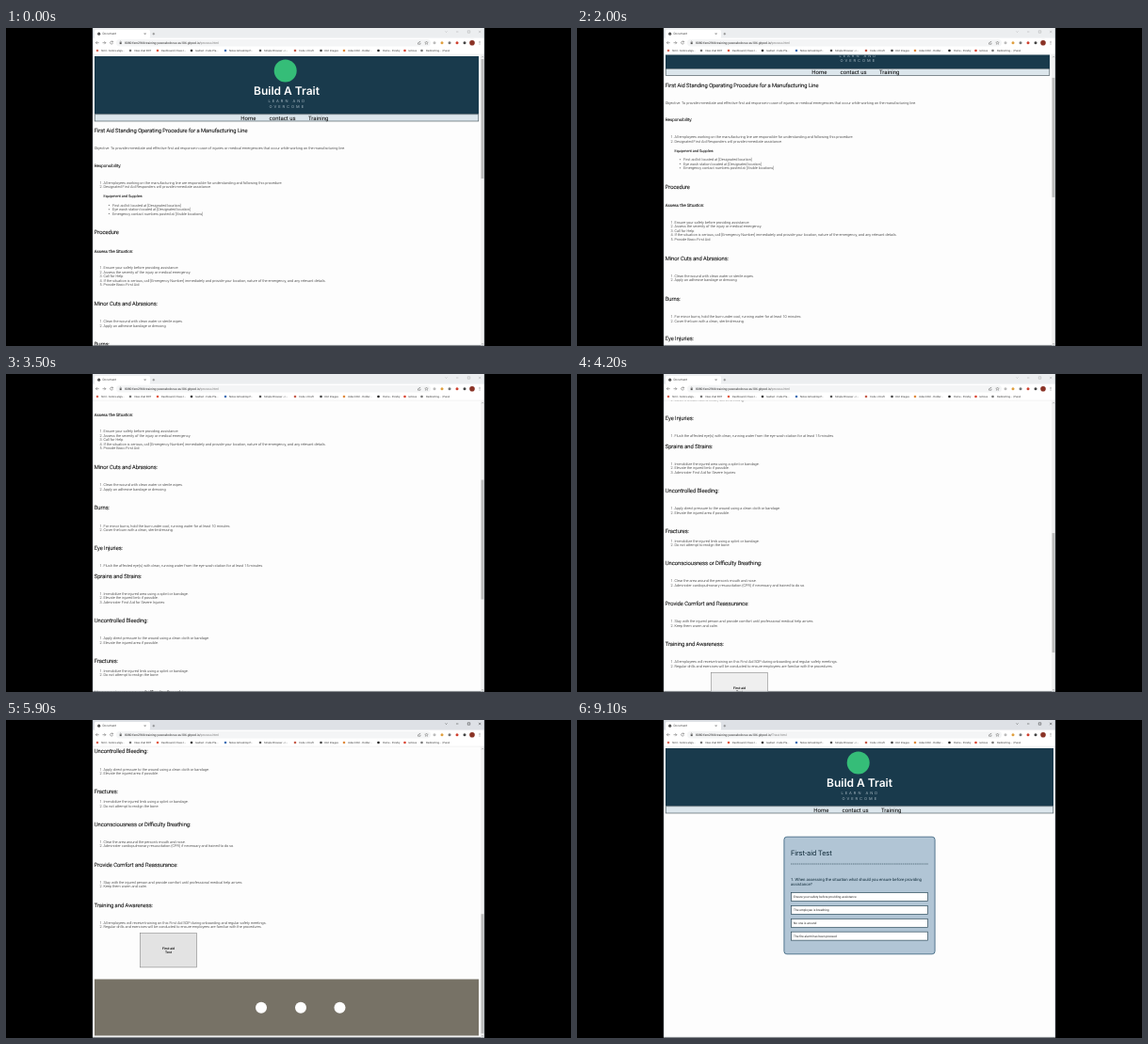
These frames come from a looping animation (600x338 px, 9400 ms). An HTML page:

```html
<!DOCTYPE html>
<html lang="en">
<head>
<meta charset="utf-8">
<title>First aid training</title>
<style>
html, body { margin: 0; width: 100%; height: 100%; overflow: hidden; background: #000; }
svg { display: block; width: 600px; height: 338px; text-rendering: geometricPrecision; font-family: Roboto, sans-serif; }
.logo { font-family: Inter, sans-serif; text-anchor: middle; }
.light, .head { font-weight: 300; fill: #111; }
.head { stroke: #111; stroke-width: 0.03em; }
</style>
</head>
<body>
<svg id="stage" viewBox="0 0 600 338"></svg>
<script>
const LOOP = 9400, CLICK = 5700, LOADED = 6000, TICK = 48.5;
const BODY = 3.89, H3 = BODY * 1.17, H2 = BODY * 1.5, LINE = 4.57;

const text = (x, y, size, str, attrs = '') =>
  `<text x="${x}" y="${y}" font-size="${size}" ${attrs}>${str}</text>`;
const rect = (x, y, w, h, fill, attrs = '') =>
  `<rect x="${x}" y="${y}" width="${w}" height="${h}" fill="${fill}" ${attrs}/>`;
const dot = (x, y, r, fill, attrs = '') =>
  `<circle cx="${x}" cy="${y}" r="${r}" fill="${fill}" ${attrs}/>`;
const line = (d, color, width = 0.5, attrs = '') =>
  `<path d="${d}" fill="none" stroke="${color}" stroke-width="${width}" ${attrs}/>`;
const light = 'class="light"';
const head = (x, y, size, str) => text(x, y, size, str, 'class="head"');

function browser() {
  const marks = [
    [97, 101, '#d86a5c', 'html - Centre align...'], [132, 136.5, '#777', 'New chat BOT'],
    [161, 165, '#e2583e', 'Dashboard | Class I...'], [197, 201, '#333', 'Gadnet - Code Pla...'],
    [233, 237, '#3b6fb5', 'Notes &amp; Desktop P...'], [270, 274, '#555', 'Simple Browser - c...'],
    [307, 311, '#c65b4a', 'Code + Draft'], [334.5, 338, '#444', 'Unit Images'],
    [359, 363, '#e08a3c', 'index.html - Holder...'], [395.5, 400, '#222', 'Home - Pondry'],
    [423.5, 427, '#d9422f', 'notices'], [441.5, 446, '#777', 'Redirecting... | Panel']
  ];
  const tools = [[463, '#e0a040'], [471, '#777'], [479, '#d0402f'], [487, '#444']];
  return rect(92, 0, 416, 28.3, '#fff') + rect(92, 0, 416, 10.6, '#dee1e6', 'id="strip"') +
    rect(94, 2, 59, 9, '#fff', 'rx="1.5"') + dot(98.7, 6.2, 1.6, '#555') +
    text(102.5, 7.4, 3.2, 'Document', 'fill="#444"') +
    line('M146.7 5.2l1.8 1.8m0-1.8l-1.8 1.8M155.5 6.2h2.6m-1.3-1.3v2.6', '#555') +
    line('M466.5 3.5l1 1 1-1M478 4h2.4M490.3 2.8h2.4v2.4h-2.4zM502 2.8l2.4 2.4m0-2.4l-2.4 2.4', '#333', 0.5, 'id="controls"') +
    rect(117, 12, 334, 7.4, '#f4f5f6', 'rx="3.7"') +
    line('M98.8 15.7h-3.4m1.5-1.5l-1.5 1.5 1.5 1.5M102.5 15.7h3.4m-1.5-1.5l1.5 1.5-1.5 1.5', '#555') +
    line('M113.3 14.7a1.5 1.5 0 1 0 .2 1.4M113.5 13.8v1.2h-1.2', '#555') +
    rect(120.7, 15.3, 2, 1.8, '#555') + line('M121.1 15.3v-1q.6-.8 1.2 0v1', '#555', 0.4) +
    line('M437.5 15.5v1.7h2.5v-1.5m-1.6.2q0-1.6 1.8-1.6', '#555') +
    line('M446.5 14l.5 1.2 1.3.1-1 .8.3 1.3-1.1-.7-1.1.7.3-1.3-1-.8 1.3-.1z', '#666', 0.4) +
    tools.map(([x, c]) => dot(x, 15.7, 1.5, c)).join('') + dot(455, 15.7, 1.5, '#bbb') +
    dot(495, 15.7, 2.8, '#8a3326') +
    [14.3, 15.7, 17.1].map(y => dot(503, y, 0.45, '#444')).join('') +
    marks.map(([ix, x, c, s]) => dot(ix, 24, 1.3, c) + text(x, 25, 2.8, s, 'fill="#333"')).join('') +
    line('M92 28.2H508', '#ddd', 0.4) +
    '<g id="url"></g>';
}

const url = path => text(126, 16.9, 3.3,
  `8080-fern2946-training-yesorabolocus-eu106.gitpod.io/<tspan fill="#777">${path}</tspan>`, 'fill="#222"');

// The header is centred, so it shifts when there is no scrollbar.
function header(width) {
  const mid = 94 + width / 2, dx = mid - 298;
  const motto = 'class="logo" fill="#a9bac4" letter-spacing="2"';
  return rect(94, 30, width, 61.5, '#193a4c') +
    dot(mid - 1.3, 45.5, 12, '#35bd78') +
    text(mid, 71, 12, 'Build A Trait', 'class="logo" font-weight="600" fill="#fff"') +
    text(mid + 0.8, 79, 4, 'LEARN AND', motto) +
    text(mid + 0.8, 84.5, 4, 'OVERCOME', motto) +
    rect(94.2, 91.8, width - 0.4, 7.2, '#dce6ec', 'stroke="#37474f" stroke-width="0.6"') +
    [[249.2, 'Home'], [279.6, 'contact us'], [321, 'Training']]
      .map(([x, s]) => text(x + dx, 97.6, 6, s)).join('');
}

const list = (y, items) => items.map((s, i) =>
  text(102.6, y + i * LINE, BODY, i + 1 + '.', light + ' text-anchor="end"') +
  text(103.5, y + i * LINE, BODY, s, light)).join('');

function guide() {
  const sections = [
    [295, 'Minor Cuts and Abrasions:', ['Clean the wound with clean water or sterile wipes.', 'Apply an adhesive bandage or dressing.']],
    [338.3, 'Burns:', ['For minor burns, hold the burn under cool, running water for at least 10 minutes.', 'Cover the burn with a clean, sterile dressing.']],
    [380.7, 'Eye Injuries:', ['Flush the affected eye(s) with clean, running water from the eye wash station for at least 15 minutes.']],
    [410.6, 'Sprains and Strains:', ['Immobilize the injured area using a splint or bandage.', 'Elevate the injured limb if possible.', 'Administer First Aid for Severe Injuries:']],
    [457.8, 'Uncontrolled Bleeding:', ['Apply direct pressure to the wound using a clean cloth or bandage.', 'Elevate the injured area if possible.']],
    [500.6, 'Fractures:', ['Immobilize the injured limb using a splint or bandage.', 'Do not attempt to realign the bone.'], 10.1],
    [535, 'Unconsciousness or Difficulty Breathing:', ['Clear the area around the person\'s mouth and nose.', 'Administer cardiopulmonary resuscitation (CPR) if necessary and trained to do so.']],
    [578, 'Provide Comfort and Reassurance:', ['Stay with the injured person and provide comfort until professional medical help arrives.', 'Keep them warm and calm.']],
    [621, 'Training and Awareness:', ['All employees will receive training on this First Aid SOP during onboarding and regular safety meetings.', 'Regular drills and exercises will be conducted to ensure employees are familiar with the procedures.']]
  ];
  const supplies = ['First aid kit located at [Designated location]', 'Eye wash station located at [Designated location]',
    'Emergency contact numbers posted at [Visible locations]'];
  return header(408) +
    head(93.7, 111, H2, 'First Aid Standing Operating Procedure for a Manufacturing Line') +
    text(93.7, 129.2, BODY, 'Objective: To provide immediate and effective first aid response in case of injuries or medical emergencies that occur while working on the manufacturing line.', light) +
    head(93.7, 147.9, H3, 'Responsibility:') +
    list(165.8, ['All employees working on the manufacturing line are responsible for understanding and following this procedure.', 'Designated First Aid Responders will provide immediate assistance.']) +
    head(103.5, 180.3, BODY, 'Equipment and Supplies:') +
    supplies.map((s, i) => dot(109.4, 188.2 + i * LINE, 0.5, '#333') +
      text(113, 189.5 + i * LINE, BODY, s, light)).join('') +
    head(93.7, 219, H2, 'Procedure') +
    head(93.7, 238.7, H3, 'Assess the Situation:') +
    list(256.2, ['Ensure your safety before providing assistance.', 'Assess the severity of the injury or medical emergency.', 'Call for Help:',
      'If the situation is serious, call [Emergency Number] immediately and provide your location, nature of the emergency, and any relevant details.', 'Provide Basic First Aid:']) +
    sections.map(([y, title, items, gap = 18.2]) => head(93.7, y, H2, title) + list(y + gap, items)).join('') +
    rect(142.3, 649.2, 60.4, 36.2, '#efefef', 'id="start" stroke="#777" stroke-width="0.5"') +
    text(172.5, 666.7, 3.5, 'First-aid', 'font-weight="500" text-anchor="middle"') +
    text(172.5, 670.7, 3.5, 'Test', 'font-weight="500" text-anchor="middle"') +
    rect(94, 698, 408, 60, '#777266') +
    [271, 313, 354.5].map(x => dot(x, 728.3, 6, '#fff')).join('');
}

function quiz() {
  const answers = ['Ensure your safety before providing assistance', 'The employee is breathing',
    'No one is around', 'The fire alarm has been pressed'];
  const ink = 'fill="#102b39"';
  return header(412) +
    rect(219.9, 124.2, 160.2, 124.6, '#b1c5d5', 'rx="3" stroke="#355f7a" stroke-width="0.8"') +
    text(227, 144, 7.6, 'First-aid Test', ink) +
    line('M227 153H373', '#27424f', 0.6, 'stroke-dasharray="1.5 0.7"') +
    text(227, 171, 4.3, '1. When assessing the situation what should you ensure before providing', ink) +
    text(227, 176.4, 4.3, 'assistance?', ink) +
    answers.map((s, i) => {
      const y = 183.6 + i * 13.85;
      return rect(227.4, y, 145.2, 9, '#fff', `id="answer${i}" stroke="#2c4a5a" stroke-width="0.7"`) +
        text(230, y + 5.6, 3.22, s, `id="label${i}" fill="#222"`);
    }).join('');
}

const $ = id => document.getElementById(id);
const show = (id, on) => $(id).setAttribute('display', on ? 'inline' : 'none');

$('stage').innerHTML =
  '<clipPath id="view"><rect x="92" y="28.4" width="416" height="309"/></clipPath>' +
  rect(92, 0, 416, 337.5, '#fdfdfd') + browser() +
  `<g clip-path="url(#view)"><g id="guide">${guide()}</g><g id="quiz">${quiz()}</g></g>` +
  '<g id="bar">' + rect(504, 28.5, 4, 309, '#f1f1f1') +
  line('M505.2 31.3l.9-1 .9 1M505.2 335.2l.9 1 .9-1', '#777') +
  rect(504.5, 33, 3, 127, '#bdbdbd', 'id="thumb"') + '</g>' +
  line('M92.2 0V337.3H507.8V0', '#8f99a3', 0.5);

const clamp = p => Math.min(1, Math.max(0, p));
const ease = p => p < 0.5 ? (2 * p) ** 2.6 / 2 : 1 - (2 - 2 * p) ** 2.6 / 2;

function track(t, points) {
  for (let i = 1; i < points.length; i++) {
    const [t0, v0] = points[i - 1], [t1, v1] = points[i];
    if (t < t1) return v0 + (v1 - v0) * clamp((t - t0) / (t1 - t0));
  }
  return points[points.length - 1][1];
}

// Four equal wheel moves, then one steady run to the bottom.
function scrollAt(t) {
  const wheel = [1600, 2200, 2800, 3200]
    .reduce((sum, start) => sum + TICK * ease(clamp((t - start) / 300)), 0);
  return wheel + track(t, [[3600, 0], [3700, 8.5], [4550, 228.5]]);
}

const mix = (a, b, p) => {
  const v = Math.round(a + (b - a) * p);
  return `rgb(${v},${v},${v})`;
};

function draw() {
  const t = Math.floor(performance.now() % LOOP / 100) * 100;
  const scroll = scrollAt(t), active = t >= CLICK, loaded = t >= LOADED;

  // The click brings the window to the front; the old page stays until the new one is ready.
  $('strip').setAttribute('fill', active ? '#dee1e6' : '#eceef0');
  $('controls').setAttribute('stroke', active ? '#333' : '#aaa');
  $('url').innerHTML = url(loaded ? 'T-test.html' : 'process.html');
  show('guide', !loaded);
  show('bar', !loaded);
  show('quiz', loaded);

  $('guide').setAttribute('transform', `translate(0 ${-scroll})`);
  $('thumb').setAttribute('y', 33 + scroll * 0.41);
  $('start').setAttribute('fill', t >= 5200 ? '#e3e3e3' : '#efefef');

  const hover = track(t, [[6600, 0], [6800, 1], [6900, 1], [7200, 0]]);
  $('answer2').setAttribute('fill', mix(255, 146, hover));
  $('label2').setAttribute('fill', mix(34, 124, hover));
  requestAnimationFrame(draw);
}
draw();
</script>
</body>
</html>
```
